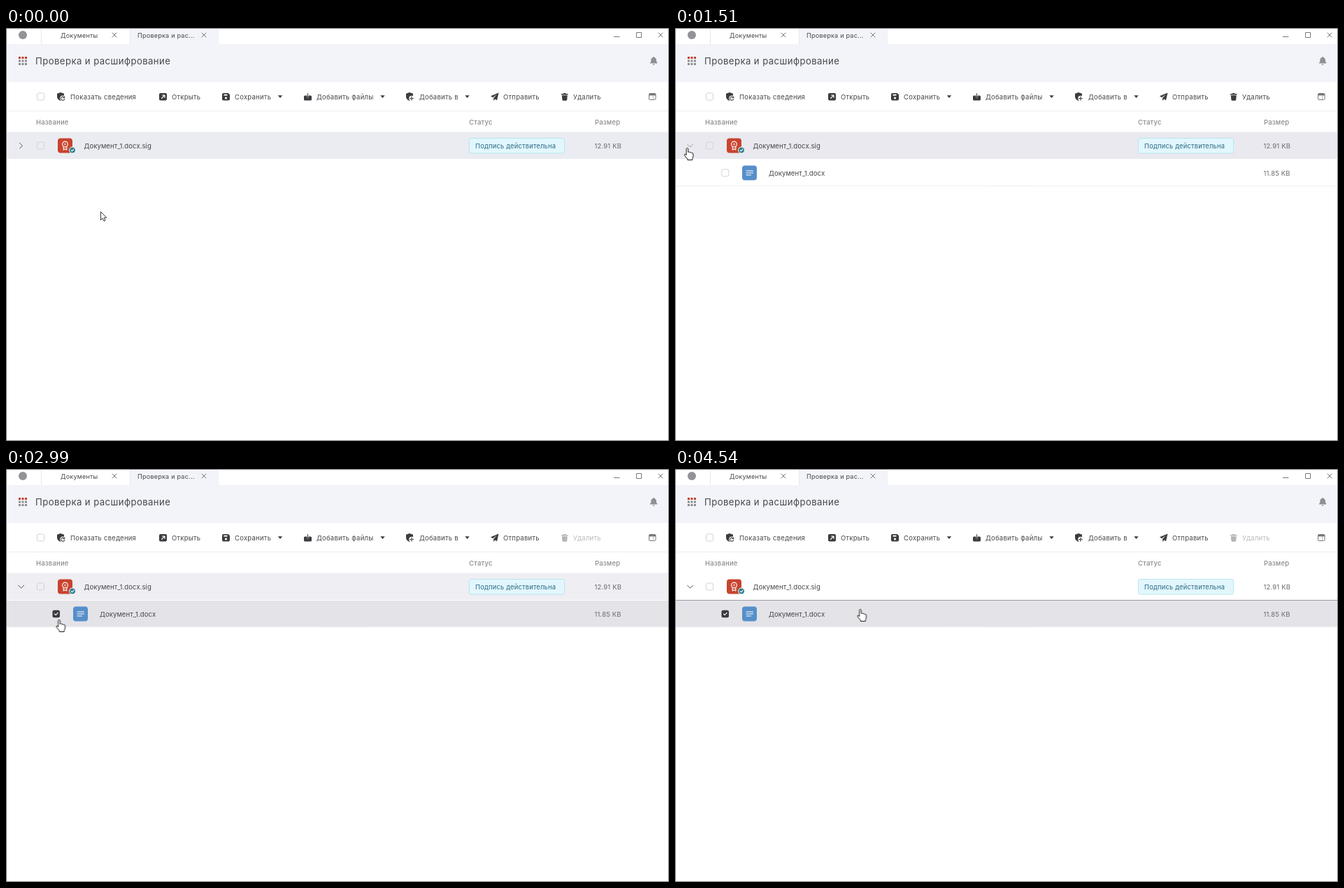
Write an HTML page that moves like this. It is 948x590 px and loops after 6.13 s.

```html
<!DOCTYPE html>
<html lang="ru">
<head>
<meta charset="utf-8">
<title>Проверка и расшифрование</title>
<style>
  html, body { margin: 0; width: 100%; height: 100%; overflow: hidden; background: #fff; }
  svg { display: block; width: 948px; height: 590px; }
  text { font: 9.5px Inter, sans-serif; fill: #47474b; }
  .tab { font-size: 9.1px; letter-spacing: .2px; }
  .title { font-size: 13.2px; letter-spacing: .4px; }
  .tools text { letter-spacing: .25px; }
  .head text { font-weight: 500; letter-spacing: .2px; fill: #8b8b90; }
  .name { font-size: 9.6px; letter-spacing: .05px; }
  .size { letter-spacing: .15px; fill: #6b6b70; }
  .status { font-size: 9.4px; letter-spacing: .2px; fill: #2b6a85; }
  .tip text { font-size: 9.25px; font-weight: 600; fill: #fff; }
  .line { fill: none; stroke: #55555a; stroke-linecap: round; stroke-linejoin: round; }
  .thin { fill: none; stroke: #77777c; }
  .white { fill: none; stroke: #fff; stroke-width: 1.1; stroke-linecap: round; stroke-linejoin: round; }
  .dark { fill: #3b3b40; }

  /* One loop of 6130 ms; hard changes unless a stop says otherwise */
  .row1, .row2, .child, .closed, .open, .tip, .mark, .trash, .edge, .arrow, .hand, .click, .cursor {
    animation: 6130ms step-end infinite;
  }
  .row1 { animation-name: row1; }
  .row2 { animation-name: row2; }
  .child { animation-name: child; }
  .closed { animation-name: closed; }
  .open { animation-name: open; }
  .tip { animation-name: tip; }
  .mark { animation-name: mark; }
  .trash { animation-name: trash; }
  .edge { animation-name: edge; }
  .arrow { animation-name: arrow; }
  .hand { animation-name: hand; }
  .click { animation-name: click; }
  .cursor { animation-name: cursor; }

  @keyframes row1 {
    0% { fill: #eaecf1; } 11.08% { fill: #e9e9ef; } 32.4% { fill: #eeeef3; }
    70.9%, 100% { fill: #fff; }
  }
  @keyframes row2 {
    0% { fill: #fff; } 32.4% { fill: #fafafc; } 46.8%, 100% { fill: #e3e3e8; }
  }
  @keyframes child { 0% { opacity: 0; } 21.36%, 100% { opacity: 1; } }
  @keyframes closed { 0% { opacity: 1; } 21.36%, 100% { opacity: 0; } }
  @keyframes open { 0% { opacity: 0; } 21.36% { opacity: .5; } 31.3%, 100% { opacity: 1; } }
  @keyframes tip { 0% { opacity: 0; } 32.4% { opacity: 1; } 38.98%, 100% { opacity: 0; } }
  @keyframes mark { 0% { opacity: 0; } 46.8%, 100% { opacity: 1; } }
  @keyframes trash { 0% { opacity: 1; } 46.8%, 100% { opacity: .38; } }
  @keyframes edge { 0% { opacity: 0; } 70.9%, 100% { opacity: 1; } }
  @keyframes arrow { 0% { opacity: 1; } 11.08%, 100% { opacity: 0; } }
  @keyframes hand { 0% { opacity: 0; } 11.08%, 100% { opacity: 1; } }
  @keyframes click {
    0% { opacity: 0; } 19.08% { opacity: .88; } 21.36% { opacity: 0; }
    45.67% { opacity: .88; } 48.77% { opacity: 0; }
    67.5% { opacity: .88; } 70.9%, 100% { opacity: 0; }
  }
  @keyframes cursor {
    0% { transform: translate(135px, 262px); }
    5.38% { transform: translate(135px, 262px); animation-timing-function: steps(6); }
    12.23% { transform: translate(32.5px, 171px); animation-timing-function: steps(3); }
    15.66% { transform: translate(14px, 170px); animation-timing-function: steps(8); }
    24.63% { transform: translate(17.5px, 171px); }
    29.03% { transform: translate(17.5px, 171px); animation-timing-function: steps(8); }
    37.84% { transform: translate(72px, 218px); animation-timing-function: steps(2); }
    40.13% { transform: translate(75.5px, 221px); animation-timing-function: steps(2); }
    42.25% { transform: translate(76px, 215px); }
    61.99% { transform: translate(76px, 215px); animation-timing-function: steps(6); }
    68.67% { transform: translate(263.5px, 190px); animation-timing-function: steps(4); }
    73.08% { transform: translate(262.5px, 193px); }
    74.06%, 100% { transform: translate(265px, 200px); }
  }
</style>
</head>
<body>
<svg viewBox="0 0 948 590" width="948" height="590">
  <defs>
    <rect id="box" x=".5" y=".5" width="10" height="10" rx="2" fill="none" stroke="#d3d3d7"/>
    <path id="cross" class="thin" d="M-3.3-3.3 3.3 3.3M3.3-3.3-3.3 3.3"/>
    <path id="caret" class="dark" d="M-3.2-1.8H3.2L0 1.9Z"/>
    <path id="shield" class="dark" d="M0 1.8 5 0 10 1.8V6Q10 10 5 12 0 10 0 6Z"/>
  </defs>

  <rect width="948" height="590" fill="#fff"/>

  <!-- title bar and heading -->
  <path d="M177 1H304.5V23H947V77H1V23H177Z" fill="#f3f4f9"/>
  <path d="M50.5 1V23M177.5 1V23" stroke="#e8e8ee"/>
  <circle cx="24" cy="10" r="6" fill="#929297"/>
  <text class="tab" x="78" y="13.5">Документы</text>
  <text class="tab" x="188" y="13.5">Проверка и рас...</text>
  <use href="#cross" x="155" y="10"/>
  <use href="#cross" x="283" y="10"/>
  <path class="thin" d="M869 12.5H877.5M901.5 6.5H908.5V13.5H901.5Z"/>
  <use href="#cross" x="936" y="10"/>
  <g fill="none" stroke-width="3" stroke-dasharray="3 1.5">
    <path d="M18 42.5H30" stroke="#c7402f"/>
    <path d="M18 47H30M18 51.5H30" stroke="#8d8d92"/>
  </g>
  <text class="title" x="42" y="52">Проверка и расшифрование</text>
  <path d="M921 50.5V49.5L922.3 48V45.5Q922.5 42.5 925.2 42V41.3H927.2V42Q929.8 42.5 930 45.5V48L931.3 49.5V50.5ZM924.7 51.5H927.6Q927.4 53 926.1 53T924.7 51.5Z" fill="#8f8f94"/>

  <!-- toolbar -->
  <g class="tools">
    <use href="#box" x="44" y="92.5"/>
    <use href="#shield" x="73" y="92"/>
    <circle cx="81.2" cy="100.6" r="4" fill="#fff"/>
    <path class="line" stroke-width="1.2" d="M83.4 99.2A2.6 2.6 0 1 0 83.7 101.5M83.7 97.8V99.6H81.9"/>
    <text x="92" y="101.5">Показать сведения</text>

    <rect class="dark" x="219" y="93" width="11" height="10.5" rx="2"/>
    <path class="white" d="M222.5 100.5 226.7 96.2M223.5 96H227V99.5"/>
    <text x="237" y="101.5">Открыть</text>

    <path class="dark" d="M311 93H317.7L320 95.2V101.5Q320 103.5 318 103.5H311Q309 103.5 309 101.5V95Q309 93 311 93Z"/>
    <path d="M311.5 94.7H316.5V96.6H311.5Z" fill="#fff"/>
    <circle cx="314.5" cy="100" r="1.6" fill="#fff"/>
    <text x="327" y="101.5">Сохранить</text>
    <use href="#caret" x="392" y="98"/>

    <path class="dark" d="M427.5 96.5H430.2V99L431.5 100.4 432.8 99V96.5H435.5Q437 96.5 437 98V102Q437 103.5 435.5 103.5H427.5Q426 103.5 426 102V98Q426 96.5 427.5 96.5Z"/>
    <path class="line" stroke-width="1.2" d="M431.5 93.5V99M429.5 97.5 431.5 99.5 433.5 97.5"/>
    <text x="444" y="101.5">Добавить файлы</text>
    <use href="#caret" x="538.5" y="98"/>

    <use href="#shield" x="572" y="92"/>
    <circle cx="580" cy="100.6" r="3.8" fill="#fff"/>
    <path class="line" stroke-width="1.3" d="M577.6 100.6H582.4M580 98.2V103"/>
    <text x="591" y="101.5">Добавить в</text>
    <use href="#caret" x="659.5" y="98"/>

    <path class="dark" d="M704.5 92.5 693 97.3 696 99.3 702 94.8 697.2 100V104L699.3 101.4 702 103.2Z"/>
    <text x="711" y="101.5">Отправить</text>

    <g class="trash">
      <path class="dark" d="M794 94H796.8L797.4 93H800.2L800.8 94H803.5V95.5H794ZM794.8 96.3H802.8L802.2 102.5Q802.1 103.8 800.8 103.8H796.8Q795.5 103.8 795.4 102.5Z"/>
      <text x="811" y="101.5">Удалить</text>
    </g>
    <rect class="thin" x="919.5" y="93.5" width="9.5" height="9" rx="1.5"/>
    <path d="M919.5 95.2H929" stroke="#77777c" stroke-width="2.4"/>
    <path d="M925.5 96V102.5" stroke="#a5a5aa" stroke-width=".8"/>
  </g>
  <path d="M1 118.5H947" stroke="#ededf0"/>

  <g class="head">
    <text x="43" y="137.5">Название</text>
    <text x="662" y="137.5">Статус</text>
    <text x="842" y="137.5">Размер</text>
  </g>

  <!-- signed file -->
  <rect class="row1" x="1" y="148.5" width="946" height="38.5"/>
  <path class="line closed" d="M19.5 164.2 23.5 168.2 19.5 172.2"/>
  <path class="line open" d="M17.7 166.2 21.7 170.2 25.7 166.2"/>
  <use href="#box" x="44" y="162.5"/>
  <rect x="74" y="157.5" width="21" height="21" rx="4" fill="#c8442f"/>
  <circle class="white" cx="84.5" cy="166" r="3.9"/>
  <circle cx="84.5" cy="166" r="1.1" fill="none" stroke="#fff" stroke-width=".7"/>
  <path class="white" d="M82.2 169.4V174L84.5 172.7 86.8 174V169.4"/>
  <circle cx="95" cy="174.5" r="4.5" fill="#2f7f8f" stroke="#fff"/>
  <path class="white" d="M93.2 174.6 94.5 175.9 96.9 173.3"/>
  <text class="name" x="111.5" y="171.7">Документ_1.docx.sig</text>
  <rect x="662.5" y="157.5" width="136" height="21.5" rx="2.5" fill="#e2f7fd" stroke="#b9e5ef"/>
  <text class="status" x="671" y="171.7">Подпись действительна</text>
  <text class="size" x="841.5" y="171.7">12.91 KB</text>

  <!-- nested document -->
  <g class="child">
    <rect class="row2" x="1" y="188" width="946" height="37.5"/>
    <path d="M1 225.8H947" stroke="#efeff2"/>
    <use href="#box" x="66.3" y="201.5"/>
    <g class="mark">
      <rect class="dark" x="66.5" y="201.7" width="10.5" height="10.5" rx="2.2"/>
      <path class="white" d="M69.5 207 71.2 208.6 74.2 205.4"/>
    </g>
    <rect x="96" y="196.5" width="21" height="21" rx="4" fill="#568fca"/>
    <path class="white" d="M102 204H111.5M102 207H111.5M102 210H108.5"/>
    <text class="name" x="134" y="210.7">Документ_1.docx</text>
    <text class="size" x="841.5" y="210.7">11.85 KB</text>
  </g>
  <path class="edge" d="M1 187.5H947" stroke="#9c9ca6"/>

  <g class="tip">
    <path d="M1 198H60Q62.5 198 62.5 200.5V214.5Q62.5 217 60 217H1Z" fill="#27272a"/>
    <text x="2" y="210.8">Скрыть все</text>
  </g>

  <rect x=".5" y=".5" width="947" height="589" fill="none" stroke="#77777a"/>

  <g class="cursor">
    <circle class="click" cx="-.3" cy="1" r="9.6" fill="#f4ec45"/>
    <path class="arrow" d="M.5.5V12.3L3.2 9.8 5 13.9 7 13 5.2 9H8.8Z" fill="#fff" stroke="#222" stroke-width=".9"/>
    <path class="hand" transform="translate(-4.5 0)" fill="#fff" stroke="#111" stroke-width=".95" stroke-linejoin="round"
      d="M3.2 1.7Q3.2.5 4.5.5T5.8 1.7V6.2Q8 5.5 8.3 6.8 10.3 6.2 10.7 7.5 12.8 7.1 13 8.8V12Q13 14 11.8 15.4V17.5H4.9V16L1.2 11.8Q0 10.1.8 9.3 1.8 8.7 3.2 10.6Z"/>
  </g>
</svg>
</body>
</html>
```
